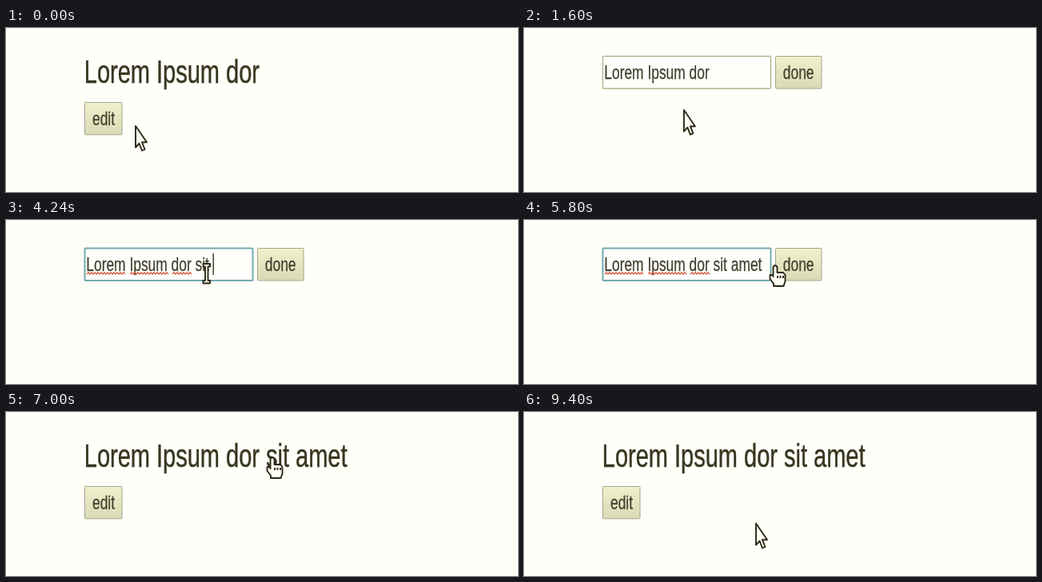
These frames come from a looping animation (640 by 206 pixels, 9440 ms). An HTML page:

```html
<!DOCTYPE html>
<html lang="en">
<head>
<meta charset="utf-8">
<title>Edit in place</title>
<style>
  html, body { margin: 0; width: 100%; height: 100%; overflow: hidden; background: #fffff9; }
  svg { display: block; width: 640px; height: 206px; }
  text { font: 17.4px "Liberation Sans", Arial, sans-serif; fill: #403e2c; stroke: #403e2c; stroke-width: .2; white-space: pre; }
  #title { font-size: 29px; fill: #38361f; stroke: #38361f; stroke-width: .35; }
  .button { fill: url(#face); stroke: #a5a48c; }
  #field { fill: #fffffc; stroke: #b3b48c; stroke-width: 1.4; }
  #field.focus { stroke: #72a9ae; stroke-width: 2; }
  #wave { fill: none; stroke: #d8502f; stroke-width: 1.2; }
  #caret { fill: #38361f; }
  #cursor path { fill: #fffff4; stroke: #2b2814; stroke-width: 1.9; stroke-linejoin: round; }
</style>
</head>
<body>
<svg viewBox="0 0 640 206">
  <defs>
    <linearGradient id="face" x2="0" y2="1">
      <stop stop-color="#f0f0cb"/>
      <stop offset="1" stop-color="#dbdab6"/>
    </linearGradient>
  </defs>

  <g id="view">
    <text id="title" transform="translate(97.8 68.8) scale(1 1.38)"></text>
    <rect class="button" x="98.5" y="93.5" width="46.5" height="40.5" rx="1"/>
    <text transform="translate(108 122) scale(1 1.38)">edit</text>
  </g>

  <g id="form">
    <rect id="field" x="98.5" y="35.5" width="210" height="40.5" rx="1"/>
    <text id="value" transform="translate(100.3 64.2) scale(1 1.38)"></text>
    <path id="wave"/>
    <rect id="caret" y="42" width="1.4" height="27"/>
    <rect class="button" x="314.5" y="35.5" width="57.5" height="40.5" rx="1"/>
    <text transform="translate(323.8 64.2) scale(1 1.38)">done</text>
  </g>

  <g id="cursor">
    <path id="arrow" d="M0 0V27L4.5 22L8 31L11.5 29.5L8 20.5H14Z"/>
    <path id="beam" d="M-4 -12H4.5V-8.5H2V9H4.5V12.5H-4V9H-1.5V-8.5H-4Z"/>
    <path id="hand" d="M-2.5 14V2Q0 -2 2.5 2V9H10L12.5 12V20L10.5 26H-2V23L-6.5 17V12H-4ZM3 13v3m3.5 -3v3m3.5 -3v3"/>
  </g>
</svg>
<script>
  const LOOP = 9440, STEP = 40;
  const OPEN = 1000, FOCUS = 2440, SPELL = 3360, BLUR = 6400, CLOSE = 6480;
  const BASE = "Lorem Ipsum dor", ADDED = " sit amet";
  const SPACE = 3280, TYPE = 3700, KEY = 180;

  // each stroke of the pointer, in order
  const moves = [
    { from: 0, to: 880, x: 126, y: 116 },
    { from: 1000, to: 1240, x: 164, y: 114 },
    { from: 1440, to: 2120, x: 250.5, y: 67 },
    { from: 5400, to: 5800, x: 314, y: 57 },
    { from: 5800, to: 6240, x: 333, y: 57 },
    { from: 7000, to: 7320, x: 314, y: 108 },
    { from: 7400, to: 8240, x: 290, y: 140 }
  ];

  const $ = id => document.getElementById(id);
  const show = (id, on) => $(id).style.display = on ? "" : "none";
  const clamp = (v, lo, hi) => Math.min(Math.max(v, lo), hi);

  // sideways motion slows down, vertical motion is steady
  function pointer(t) {
    let x = 162, y = 123;
    for (const m of moves) {
      const k = clamp((t - m.from) / (m.to - m.from), 0, 1);
      x += (m.x - x) * k * (2 - k);
      y += (m.y - y) * k;
    }
    return [x, y];
  }

  function shape(t, x, y) {
    if (t <= OPEN) return x < 145 ? "hand" : "arrow";
    if (t > 7000 || y > 76) return "arrow";
    return x > 308 ? "hand" : "beam";
  }

  // red waves under the misspelt words
  function squiggle(from, to) {
    let d = `M${from} 68`;
    for (let x = from + 2; x <= to; x += 4) d += `L${x} 65.8L${x + 2} 68`;
    return d;
  }
  $("wave").setAttribute("d", squiggle(101, 149) + squiggle(155, 201) + squiggle(208, 231));

  function typing(t) {
    if (t < SPACE) return { count: 0, last: FOCUS };
    if (t < TYPE) return { count: 1, last: SPACE };
    const n = clamp(Math.floor((t - TYPE) / KEY), 0, ADDED.length - 2);
    return { count: n + 2, last: TYPE + n * KEY };
  }

  function draw(t) {
    const editing = t >= OPEN && t < CLOSE;
    const focused = t >= FOCUS && t < BLUR;
    const { count, last } = typing(t);
    const text = BASE + ADDED.slice(0, count);

    show("view", !editing);
    show("form", editing);
    $("title").textContent = $("value").textContent = text;
    $("field").classList.toggle("focus", focused);
    show("wave", t >= SPELL);

    // the caret restarts its blink on every key
    const lit = focused && (t - last) % 1000 < 500;
    show("caret", lit);
    if (lit) $("caret").setAttribute("x", 100 + $("value").getComputedTextLength());

    const [x, y] = pointer(t), kind = shape(t, x, y);
    for (const id of ["arrow", "beam", "hand"]) show(id, id === kind);
    $("cursor").setAttribute("transform", `translate(${x} ${y})`);
  }

  const start = performance.now();
  function tick() {
    const t = (performance.now() - start) % LOOP;
    draw(Math.floor(t / STEP) * STEP);
    requestAnimationFrame(tick);
  }
  tick();
</script>
</body>
</html>
```
